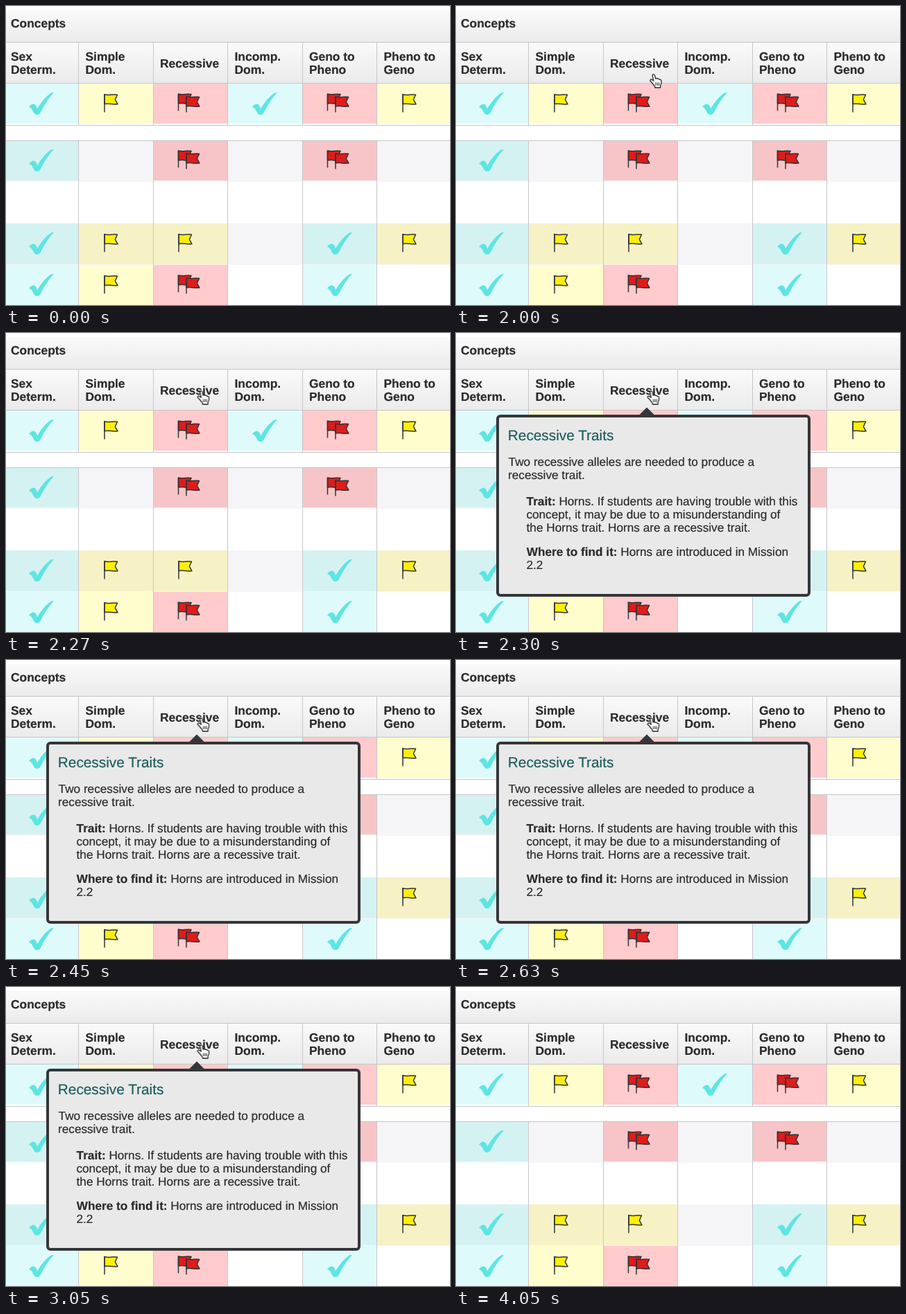
These frames come from a looping animation (640 px wide and 432 px high, 5050 ms). An HTML page:

```html
<!DOCTYPE html>
<html lang="en">
<head>
<meta charset="utf-8">
<title>Concepts table</title>
<style>
  html, body { margin: 0; width: 100%; height: 100%; overflow: hidden; background: #fff; }
  svg { display: block; width: 640px; height: 432px; }
  text {
    font-family: "Liberation Sans", Arial, sans-serif; text-rendering: geometricPrecision;
    fill: #2b2b2b; stroke: #2b2b2b; stroke-width: .2;
  }
  .head { font-size: 17.4px; font-weight: bold; }
  .body { font-size: 17.2px; }
  .title { font-size: 20.8px; fill: #1d5d5d; stroke: #1d5d5d; }
  .rule { fill: #c6c6c8; }
  .ink { stroke: #333; stroke-width: 1.5; stroke-linejoin: round; }
  #tip { animation: tip 5050ms step-end infinite; }
  #cursor { animation: show 5050ms step-end infinite, move 5050ms linear infinite; }
  @keyframes tip {
    0% { opacity: 0; }
    45.545% { opacity: 1; }
    80.198%, 100% { opacity: 0; }
  }
  @keyframes show {
    0% { opacity: 0; }
    39.604% { opacity: 1; }
    80.198%, 100% { opacity: 0; }
  }
  @keyframes move {
    0% { transform: translate(279px, 98px); }
    39.604% { transform: translate(279px, 98px); animation-timing-function: ease-out; }
    44.356%, 100% { transform: translate(275.5px, 83px); }
  }
</style>
</head>
<body>
<svg viewBox="0 0 640 432">
  <defs>
    <linearGradient id="bar" x2="0" y2="1">
      <stop offset="0" stop-color="#fafafa"/><stop offset="1" stop-color="#ebebec"/>
    </linearGradient>
    <path id="check" fill="#5ee5e2" d="M33 147Q36 142.5 40 142.5Q43.5 143 45 149.5Q54 134 65 126.5L69 126Q57 139 49.5 155.5Q47.5 158.5 43.5 158Q41 157.5 39.5 154Q37 148 33 147Z"/>
    <path id="cloth" d="M0 0Q5 .8 9.5 .2T18.5 .3L15.3 7.2L19 13.8Q14 14.4 9.5 13.6T0 13.6Z"/>
    <g id="yellow" class="ink" fill="#ffee0a">
      <use href="#cloth" x="142" y="129"/><path d="M142 128V154.5"/>
    </g>
    <g id="red" class="ink" fill="#e01b1b">
      <use href="#cloth" x="141.5" y="128.3"/><path d="M141.5 127.5V152.5"/>
      <use href="#cloth" x="153" y="132.3"/><path d="M153 131.5V154.5"/>
    </g>
  </defs>

  <rect y="6" width="640" height="46" fill="url(#bar)"/>
  <rect y="53" width="640" height="58" fill="url(#bar)"/>
  <rect y="195" width="640" height="59" fill="#f5f5f7"/>
  <rect y="314" width="640" height="60" fill="#f5f5f7"/>
  <g id="cells"></g>
  <g id="rules"></g>
  <g id="heads" class="head"><text x="7" y="31">Concepts</text></g>

  <g id="tip">
    <rect x="60" y="120" width="449" height="259" rx="4" fill="#e9e9e9" stroke="#353639" stroke-width="4"/>
    <path d="M263.5 119L275 107.5L286.5 119Z" fill="#353639"/>
    <text class="title" x="74.8" y="155">Recessive Traits</text>
    <g class="body">
      <text x="75.6" y="192.4">Two recessive alleles are needed to produce a</text>
      <text x="75" y="211.4">recessive trait.</text>
      <text x="101.6" y="248.6"><tspan font-weight="bold">Trait:</tspan> Horns. If students are having trouble with this</text>
      <text x="101.4" y="267.6">concept, it may be due to a misunderstanding of</text>
      <text x="101.6" y="286.6">the Horns trait. Horns are a recessive trait.</text>
      <text x="101.8" y="322.2"><tspan font-weight="bold">Where to find it:</tspan> Horns are introduced in Mission</text>
      <text x="101.4" y="341.2">2.2</text>
    </g>
  </g>

  <g id="cursor" stroke="#222" stroke-width="1.3" stroke-linejoin="round">
    <path fill="#fff" d="M4.2 2.6Q4 .8 5.6 .8Q7.2 .8 7.6 2.6L8.6 7Q10.6 5.8 11.6 7.4Q13.6 6.6 14.4 8.4Q16.8 8 17 10.4V13Q16.8 15 15.6 17V20H8L7.6 18.2Q5.5 15.5 3.6 13L.9 10.2Q.4 8.6 2 8.2Q3.4 8 5.8 10.4Z"/>
    <path fill="none" stroke-width="1" d="M9 12.5V17M11.3 12.5V17M13.6 12.5V17"/>
  </g>
</svg>
<script>
  const STEP = 107.5;
  const colors = {
    check: ['#dffafb', '#d5f2f2'],
    yellow: ['#fffccd', '#f6f2c6'],
    red: ['#ffcbcd', '#f7c5c7']
  };
  const kinds = { c: 'check', y: 'yellow', r: 'red' };
  // Cell top, height, icon shift, tint (1 = shaded row), icons by column
  const rows = [
    [112, 58, -1, 0, 'cyrcry'],
    [195, 57, 81, 1, 'c.r.r.'],
    [314, 59, 201, 1, 'cyy.cy'],
    [374, 58, 261, 0, 'cyr.c.']
  ];
  const heads = [['Sex', 'Determ.'], ['Simple', 'Dom.'], ['Recessive'],
                 ['Incomp.', 'Dom.'], ['Geno to', 'Pheno'], ['Pheno to', 'Geno']];

  function add(parent, tag, attrs, text = '') {
    const el = document.createElementNS('http://www.w3.org/2000/svg', tag);
    for (const key in attrs) el.setAttribute(key, attrs[key]);
    el.textContent = text;
    document.getElementById(parent).append(el);
  }
  const left = col => Math.ceil(col * STEP - 2.6);
  const rule = (x, y, width, height) => add('rules', 'rect', { class: 'rule', x, y, width, height });

  for (const [y, height, shift, tint, icons] of rows) {
    [...icons].forEach((code, col) => {
      const kind = kinds[code];
      if (!kind) return;
      add('cells', 'rect', { x: left(col), y, width: left(col + 1) - left(col), height, fill: colors[kind][tint] });
      const origin = kind === 'check' ? 0 : 1;
      add('cells', 'use', { href: '#' + kind, x: Math.floor((col - origin) * STEP), y: shift });
    });
  }

  for (const y of [52, 111, 172, 194]) rule(0, y, 640, 1);
  for (let col = 1; col < 6; col++) {
    rule(left(col) - 1, 53, 1, 120);
    rule(left(col) - 1, 194, 1, 238);
  }

  heads.forEach((lines, col) => lines.forEach((line, i) =>
    add('heads', 'text', { x: 7 + col * STEP, y: (lines.length > 1 ? 78.6 : 88.5) + i * 19 }, line)));
</script>
</body>
</html>
```
